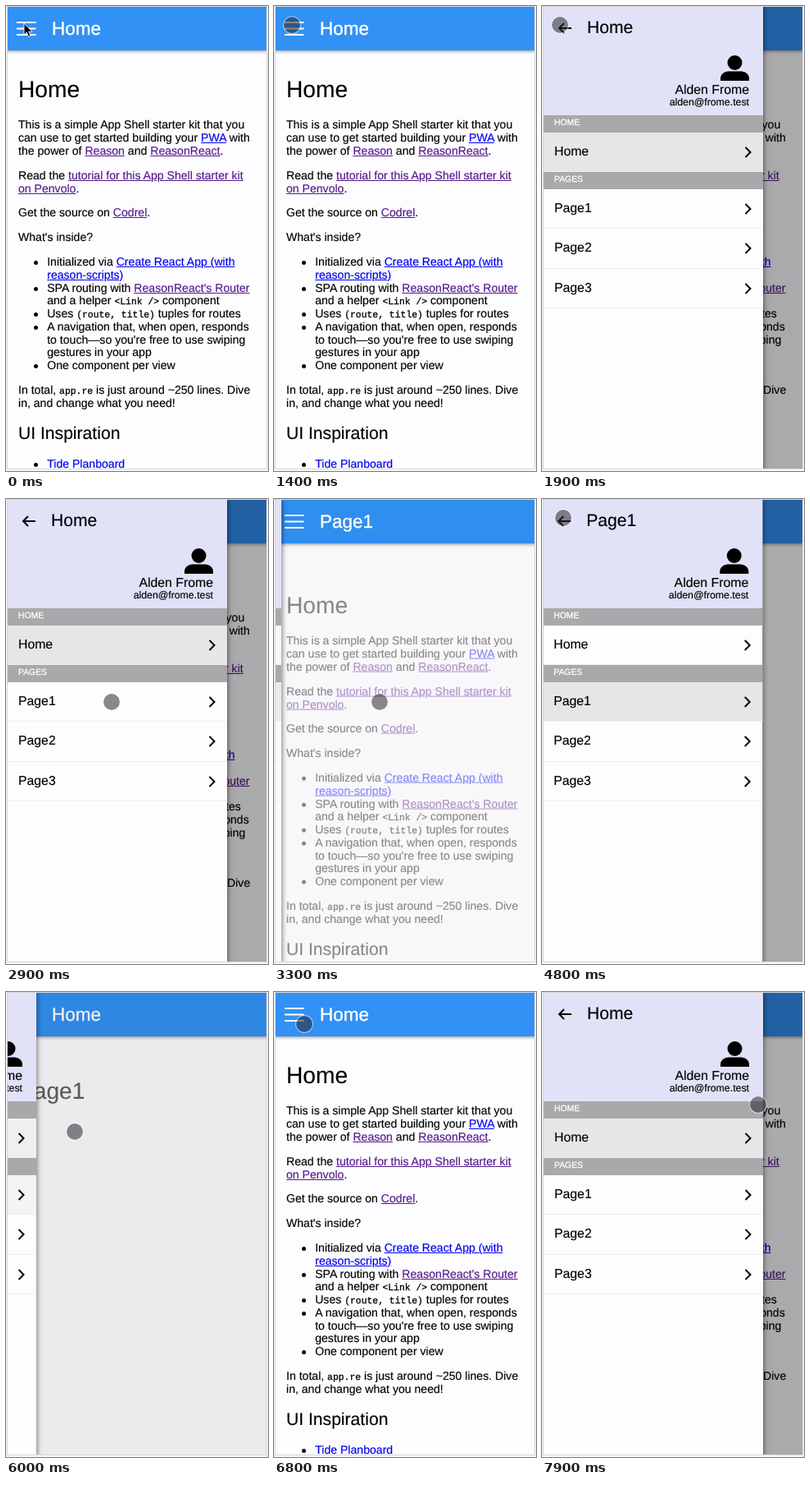
Animation of 320 by 566 pixels, one loop 8 s. Source, as an HTML page:

```html
<!DOCTYPE html>
<html lang="en">
<head>
<meta charset="utf-8">
<title>App shell</title>
<style>
  html, body { margin: 0; width: 100%; height: 100%; overflow: hidden; background: #f9f9fa; }
  body { font: 14.08px/15.77px "Liberation Sans", Arial, sans-serif; color: #000;
    text-rendering: geometricPrecision; -webkit-text-stroke: .15px; }
  #app { position: absolute; left: 1px; top: 0; width: 318px; height: 564px; box-sizing: border-box;
    border: 1px solid #d6d6d9; overflow: hidden; background: #fdfcff; }
  #view { position: absolute; left: -2px; top: -1px; width: 320px; height: 566px; white-space: nowrap; }
  #view > *, #nav > * { position: absolute; }
  svg { overflow: visible; fill: none; }

  #head { left: 0; top: 0; width: 320px; height: 54px; background: #3191f4; box-shadow: 0 1px 4px rgba(0,0,0,.45); }
  #head svg { position: absolute; left: 0; top: 0; }
  .title { position: absolute; left: 55px; top: 12px; font-size: 21.1px; line-height: 30px; }
  #head .title { left: 56px; top: 13px; font-size: 22.5px; color: #fff; -webkit-text-stroke: .4px; }

  .page { left: 15px; top: 86px; }
  .page h1 { margin: 0 0 18.8px; font: 28.16px/32.6px "Liberation Sans", Arial, sans-serif; }
  .page h2 { margin: 17.5px 0; font: 21.12px/23.8px "Liberation Sans", Arial, sans-serif; }
  .page p, .page ul { margin: 0 0 14.08px; }
  .page ul { padding: 0; list-style: none; }
  .page li { position: relative; padding-left: 35.2px; }
  .page li::before { content: ""; position: absolute; left: 18.5px; top: 6px; width: 5px; height: 5px;
    border-radius: 50%; background: #000; }
  a { color: #00e; text-decoration: underline; }
  a.seen { color: #551a8b; }
  code { font: 11.4px/0 "Liberation Mono", "Courier New", monospace; -webkit-text-stroke: .3px; }

  #dim { inset: 0; background: #000; }
  #nav { left: 0; top: 0; width: 270px; height: 566px; background: #fdfdfe; box-shadow: 1px 0 6px rgba(0,0,0,.5); }
  #band { left: 0; top: 0; width: 270px; height: 133px; background: #e1e1f8; }
  .who { right: 17px; }
  .bar { left: 0; width: 270px; height: 21px; background: #a9a8aa; color: #fff; text-indent: 15px;
    font-size: 10.4px; line-height: 20px; -webkit-text-stroke: .3px; }
  .row { left: 0; width: 270px; height: 48.3px; box-sizing: border-box; border-bottom: 1px solid #efeef0;
    font-size: 15.8px; line-height: 48px; text-indent: 15px; }
  .row svg { position: absolute; left: 247px; top: 17px; }

  #touch { left: -11px; top: -11px; width: 22px; height: 22px; box-sizing: border-box; border-radius: 50%;
    background: rgba(40,40,45,.54); border: 1.5px solid rgba(255,255,255,.5); background-clip: padding-box; }
  #arrow { left: 22px; top: 21px; }
</style>
</head>
<body>
<div id="app"><div id="view">
  <div class="page" id="home">
    <h1>Home</h1>
    <p>This is a simple App Shell starter kit that you<br>can use to get started building your <a>PWA</a> with<br>the power of <a class="seen">Reason</a> and <a class="seen">ReasonReact</a>.</p>
    <p>Read the <a class="seen">tutorial for this App Shell starter kit<br>on Penvolo</a>.</p>
    <p>Get the source on <a class="seen">Codrel</a>.</p>
    <p>What's inside?</p>
    <ul>
      <li>Initialized via <a>Create React App (with<br>reason-scripts)</a></li>
      <li>SPA routing with <a class="seen">ReasonReact's Router</a><br>and a helper <code>&lt;Link /&gt;</code> component</li>
      <li>Uses <code>(route, title)</code> tuples for routes</li>
      <li>A navigation that, when open, responds<br>to touch—so you're free to use swiping<br>gestures in your app</li>
      <li>One component per view</li>
    </ul>
    <p>In total, <code>app.re</code> is just around ~250 lines. Dive<br>in, and change what you need!</p>
    <h2>UI Inspiration</h2>
    <ul><li><a>Tide Planboard</a></li></ul>
  </div>
  <div class="page" id="page1"><h1>Page1</h1></div>

  <div id="head">
    <svg width="40" height="54" stroke="#fff" stroke-width="2"><path d="M13 20H36.5M13 27.5H36.5M13 35H36.5"/></svg>
    <div class="title"></div>
  </div>
  <div id="dim"></div>

  <div id="nav">
    <div id="band"></div>
    <svg width="40" height="54" stroke="#000" stroke-width="2"><path d="M36 27H21M27 21L21 27L27 33"/></svg>
    <div class="title"></div>
    <svg width="270" height="100"><g fill="#000"><circle cx="235.5" cy="69" r="9"/><path d="M218 91V88C218 82 224 79.5 229 79.5H242C247 79.5 253 82 253 88V91Z"/></g></svg>
    <div class="who" style="top:95px;font-size:15.84px">Alden Frome</div>
    <div class="who" style="top:110px;font-size:12.32px">alden@frome.test</div>
    <div class="bar" style="top:133px">HOME</div>
    <div class="bar" style="top:202px">PAGES</div>
  </div>

  <div id="touch"></div>
  <svg id="arrow" width="12" height="18"><path d="M0 0V14L3.3 11L5.6 16.4L8 15.4L5.7 10.2H10Z" fill="#000" stroke="#fff" stroke-width=".9"/></svg>
</div></div>

<script>
const LOOP = 8000, STEP = 100;
const TO_PAGE1 = 3018, TO_HOME = 5803, LEAVE = 510, ENTER = 375, SHIFT = 50;

// Finger position: time, x, y
const FINGER = [
  [0, 22, 24], [1900, 22, 23], [2100, 24, 30], [2700, 129, 247], [3500, 129, 247],
  [4300, 26, 23], [4900, 26, 23], [5600, 84, 170], [6200, 84, 170], [6800, 37, 39],
  [7200, 8, 122], [7700, 258, 136], [7900, 264, 137]
];
const ROWS = [["Home", 154], ["Page1", 223], ["Page2", 271.3], ["Page3", 319.6]];

const $ = id => document.getElementById(id);
const clamp = v => Math.max(0, Math.min(1, v));
const mix = (a, b, p) => a + (b - a) * p;
const easeOut = p => 1 - (1 - p) ** 3;
const easeBoth = p => p * p * (3 - 2 * p);
const ramp = (t, start, length) => clamp((t - start) / length);

const rows = ROWS.map(([name, top]) => {
  const row = document.createElement("div");
  row.className = "row";
  row.style.top = top + "px";
  row.innerHTML = name + '<svg width="10" height="14" stroke="#000" stroke-width="2"><path d="M1.5 1L7.5 7L1.5 13"/></svg>';
  $("nav").append(row);
  return row;
});
const titles = document.querySelectorAll(".title");

function finger(t) {
  const i = FINGER.findIndex(k => k[0] > t);
  if (i < 0) return FINGER.at(-1).slice(1);
  const [a, b] = [FINGER[i - 1], FINGER[i]];
  const p = easeBoth((t - a[0]) / (b[0] - a[0]));
  return [mix(a[1], b[1], p), mix(a[2], b[2], p)];
}

// Share of the drawer that is open
function drawer(t, x) {
  if (t >= 7200) return t >= 7800 ? 1 : clamp((x - 8) / 254);
  if (t >= TO_HOME) return 1 - easeOut(ramp(t, TO_HOME, 400));
  if (t >= 4500) return easeOut(ramp(t, 4500, 350));
  if (t >= TO_PAGE1) return 1 - easeOut(ramp(t, TO_PAGE1, 400));
  return easeOut(ramp(t, 1400, 350));
}

function showPage(el, away) {
  el.style.opacity = 1 - away;
  el.style.transform = `translateY(${SHIFT * away}px)`;
}

const leaving = (t, start) => ramp(t, start, LEAVE);
const entering = (t, start) => 1 - easeOut(ramp(t, start + LEAVE, ENTER));

function render(t) {
  const [x, y] = finger(t);
  const open = drawer(t, x);
  const back = t >= TO_HOME;
  const onPage1 = t >= TO_PAGE1 && !back;

  showPage($("home"), back ? entering(t, TO_HOME) : leaving(t, TO_PAGE1));
  showPage($("page1"), back ? leaving(t, TO_HOME) : entering(t, TO_PAGE1));
  for (const el of titles) el.textContent = onPage1 ? "Page1" : "Home";

  const picked = ramp(t, TO_PAGE1, 350) - ramp(t, TO_HOME, 350);
  [1 - picked, picked].forEach((p, i) => {
    rows[i].style.background = `rgba(231,229,231,${p})`;
  });

  $("dim").style.opacity = .33 * open ** .75;
  $("nav").style.visibility = open > 0 ? "visible" : "hidden";
  $("nav").style.transform = `translateX(${-268 * (1 - open)}px)`;

  const touching = t >= 300;
  $("touch").style.visibility = touching ? "visible" : "hidden";
  $("arrow").style.visibility = touching ? "hidden" : "visible";
  $("touch").style.transform = `translate(${x}px, ${y}px)`;
}

const begin = performance.now();
function tick() {
  const t = (performance.now() - begin) % LOOP;
  render(Math.floor(t / STEP) * STEP);
  requestAnimationFrame(tick);
}
tick();
</script>
</body>
</html>
```
